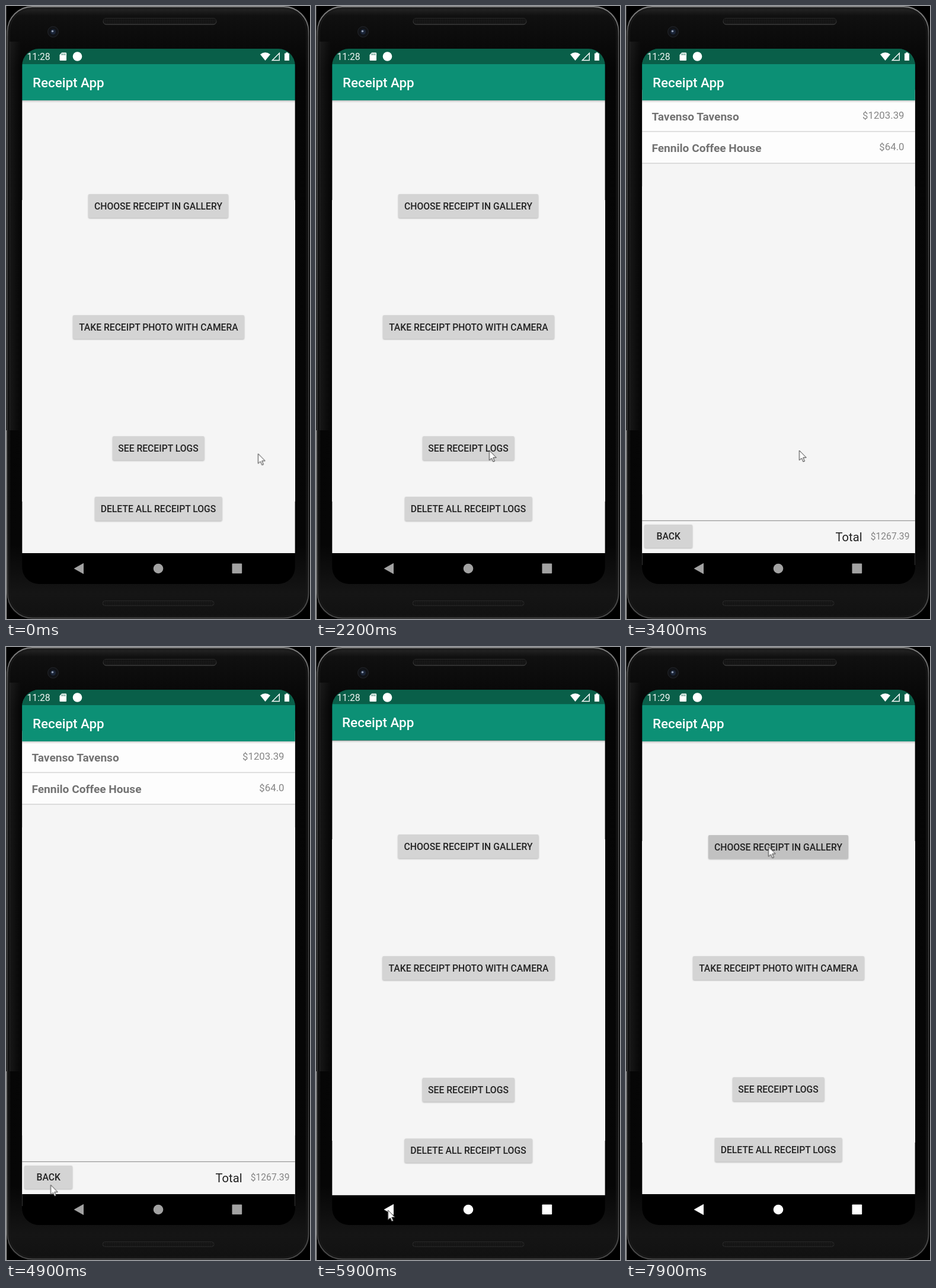
These frames come from a looping animation (513 px wide and 1033 px high, 8 s). An HTML page:

```html
<!DOCTYPE html>
<html lang="en">
<head>
<meta charset="utf-8">
<title>Receipt App demo</title>
<style>
  html, body { margin: 0; width: 100%; height: 100%; overflow: hidden; background: #000; }
  svg { display: block; width: 513px; height: 1033px; }
  text { font-family: Roboto, sans-serif; }

  .title { font-size: 22.4px; font-weight: 500; fill: #fff; }
  .clock { font-size: 15.7px; fill: #f1f6f4; }
  .button rect { fill: #d4d4d4; filter: drop-shadow(0 1px 1px #0004); }
  .button text { font-size: 15.7px; font-weight: 500; fill: #222; text-anchor: middle; }
  .name { font-size: 19.1px; font-weight: 700; fill: #727272; }
  .price { font-size: 16.8px; fill: #858585; text-anchor: end; }
  .price.sum { font-size: 15.7px; }
  .total { font-size: 20.2px; fill: #222; }
  .raised { filter: drop-shadow(0 0 4px #0009); }

  /* One loop is 8 s; 1.25% is one 100 ms tick. */
  .menu, .logs, .nav, .early, .late, .cursor, #see rect, #choose rect {
    animation: 8s step-end infinite;
  }
  .menu, .logs { transform-origin: 257.5px 521px; }
  .menu { animation-name: menu; }
  .logs { animation-name: logs; }
  .nav { animation-name: nav; }
  .early { animation-name: early; }
  .late { animation-name: late; }
  .cursor { animation-name: cursor; }
  #see rect { animation-name: press-see; }
  #choose rect { animation-name: press-choose; }

  @keyframes menu {
    0% { transform: scale(1); }
    37.5% { transform: scale(1.001); }
    38.75% { transform: scale(1.042); }
    40% { transform: scale(1.048); }
    41.25% { transform: scale(1.05); }
    71.25% { transform: scale(1.1); }
    72.5% { transform: scale(1.019); }
    73.75% { transform: scale(1.0045); }
    75% { transform: scale(1.0007); }
    76.25%, 100% { transform: scale(1); }
  }
  @keyframes logs {
    0% { opacity: 0; transform: scale(.85); }
    38.75% { opacity: 1; transform: scale(.976); }
    40% { opacity: 1; transform: scale(.994); }
    41.25% { opacity: 1; transform: scale(.999); }
    42.5% { opacity: 1; transform: scale(1); }
    71.25% { opacity: 1; transform: scale(.9995); }
    72.5%, 100% { opacity: 0; transform: scale(.919); }
  }
  @keyframes nav {
    0% { fill: #a2a2a2; }
    70%, 100% { fill: #fff; }
  }
  @keyframes early {
    0% { opacity: 1; }
    87.5%, 100% { opacity: 0; }
  }
  @keyframes late {
    0% { opacity: 0; }
    87.5%, 100% { opacity: 1; }
  }
  @keyframes press-see {
    0% { fill: #d4d4d4; }
    31.25% { fill: #d4d4d4; animation-timing-function: steps(3); }
    35% { fill: #c1c1c1; }
    42.5%, 100% { fill: #d4d4d4; }
  }
  @keyframes press-choose {
    0% { fill: #d4d4d4; }
    95% { fill: #d4d4d4; animation-timing-function: steps(3); }
    98.75%, 100% { fill: #c1c1c1; }
  }
  @keyframes cursor {
    0% { transform: translate(425.5px, 754.5px); }
    5% { transform: translate(425.5px, 754px); }
    15% { transform: translate(425.5px, 754px); animation-timing-function: steps(3); }
    18.75% { transform: translate(409.5px, 754px); }
    20% { transform: translate(409.5px, 754px); animation-timing-function: steps(5); }
    26.25% { transform: translate(287px, 748px); }
    27.5% { transform: translate(292.5px, 749px); }
    46.25% { transform: translate(292.5px, 749px); animation-timing-function: steps(5); }
    52.5% { transform: translate(165px, 840px); animation-timing-function: steps(4); }
    57.5% { transform: translate(84.5px, 900px); }
    58.75% { transform: translate(75.5px, 906.5px); }
    61.25% { transform: translate(75.5px, 906.5px); animation-timing-function: steps(6); }
    68.75% { transform: translate(121.5px, 949px); }
    80% { transform: translate(121.5px, 949px); animation-timing-function: steps(3); }
    83.75% { transform: translate(135px, 880px); animation-timing-function: steps(5); }
    90% { transform: translate(222px, 420px); animation-timing-function: steps(3); }
    93.75%, 100% { transform: translate(240.5px, 336.5px); }
  }
</style>
</head>
<body>
<svg viewBox="0 0 513 1033">
  <defs>
    <linearGradient id="body" x2="0" y2="1">
      <stop offset="0" stop-color="#2a2a2a"/>
      <stop offset=".015" stop-color="#101010"/>
      <stop offset=".1" stop-color="#050505"/>
      <stop offset=".88" stop-color="#060606"/>
      <stop offset=".96" stop-color="#151515"/>
      <stop offset="1" stop-color="#111"/>
    </linearGradient>
    <linearGradient id="rim" x2="0" y2="1">
      <stop offset="0" stop-color="#858585"/>
      <stop offset=".05" stop-color="#505050"/>
      <stop offset=".7" stop-color="#333"/>
      <stop offset="1" stop-color="#484848"/>
    </linearGradient>
    <linearGradient id="glint">
      <stop offset="0" stop-color="#fff" stop-opacity=".07"/>
      <stop offset="1" stop-color="#fff" stop-opacity="0"/>
    </linearGradient>
    <linearGradient id="lip" x2="0" y2="1">
      <stop offset=".3" stop-color="#242424"/>
      <stop offset="1" stop-color="#4c4c4c"/>
    </linearGradient>
    <linearGradient id="shade" x2="0" y2="1">
      <stop offset="0" stop-opacity=".2"/>
      <stop offset="1" stop-opacity="0"/>
    </linearGradient>
    <pattern id="mesh" width="3" height="3" patternUnits="userSpaceOnUse">
      <rect width="3" height="3" fill="#191919"/>
      <circle cx="1.5" cy="1.5" r=".8" fill="#060606"/>
    </pattern>
    <clipPath id="screen"><rect x="27.3" y="72" width="460.4" height="902" rx="28"/></clipPath>
    <g id="page">
      <rect x="27" y="72" width="461" height="902"/>
      <rect x="27" y="72" width="461" height="26" fill="#095f49"/>
      <rect x="27" y="159" width="461" height="763" fill="#f5f5f5"/>
      <rect x="27" y="98" width="461" height="61" fill="#0c9075"/>
      <text class="title" x="45" y="137">Receipt App</text>
    </g>
    <rect id="shadow" x="27" y="159" width="461" height="4" fill="url(#shade)"/>
  </defs>

  <!-- phone body -->
  <rect width="513" height="1033"/>
  <rect x="2.5" y="1" width="508" height="1030.500" rx="42" fill="url(#body)" stroke="url(#rim)" stroke-width="2"/>
  <rect x="6" y="4.5" width="501" height="1024" rx="38" fill="none" stroke="#191919" stroke-width="1.5"/>
  <rect x="6" y="60" width="20" height="655" fill="url(#glint)"/>
  <path d="M.5 0V715" stroke="#3a3a3a"/>
  <path d="M.5 715V1033" stroke="#b5b5b5"/>
  <rect x="164" y="20.5" width="191" height="10.5" rx="5" fill="url(#mesh)" stroke="url(#lip)"/>
  <rect x="163" y="1002.5" width="188" height="8" rx="4" fill="url(#mesh)" stroke="#2b2b2b"/>
  <circle cx="79.5" cy="43.5" r="9" fill="#111317" stroke="#24262a"/>
  <circle cx="79.5" cy="43.5" r="4.5" fill="#1c2638"/>
  <circle cx="78.5" cy="42.5" r="1.8" fill="#8e9ab0"/>

  <g clip-path="url(#screen)">
    <g class="menu">
      <use href="#page"/>
      <use href="#shadow"/>
      <g class="button" id="choose">
        <rect x="139" y="317" width="236" height="40" rx="2"/>
        <text x="257" y="343">CHOOSE RECEIPT IN GALLERY</text>
      </g>
      <g class="button">
        <rect x="113" y="521" width="289" height="40" rx="2"/>
        <text x="257.5" y="547">TAKE RECEIPT PHOTO WITH CAMERA</text>
      </g>
      <g class="button" id="see">
        <rect x="180" y="725" width="154.5" height="40.5" rx="2"/>
        <text x="257" y="750.5">SEE RECEIPT LOGS</text>
      </g>
      <g class="button">
        <rect x="150" y="827" width="214.5" height="40.5" rx="2"/>
        <text x="257" y="852.5">DELETE ALL RECEIPT LOGS</text>
      </g>
    </g>

    <g class="logs">
      <rect class="raised" x="27" y="72" width="461" height="902"/>
      <use href="#page"/>
      <rect x="27" y="159" width="461" height="106" fill="#fdfdfd"/>
      <path d="M27 211.5H488M27 265H488" stroke="#d4d4d4" stroke-width="1.3"/>
      <use href="#shadow"/>
      <text class="name" x="43.5" y="192.5">Tavenso Tavenso</text>
      <text class="price" x="469.5" y="190">$1203.39</text>
      <text class="name" x="43.5" y="245.5">Fennilo Coffee House</text>
      <text class="price" x="469.5" y="243">$64.0</text>
      <path d="M27 867.3H488" stroke="#999" stroke-width="1.3"/>
      <g class="button">
        <rect x="31" y="874" width="81" height="39" rx="2"/>
        <text x="71.7" y="898.5">BACK</text>
      </g>
      <text class="total" x="353.5" y="901.8">Total</text>
      <text class="price sum" x="478.5" y="898.5">$1267.39</text>
    </g>

    <!-- system bars -->
    <text class="clock early" x="35.5" y="91">11:28</text>
    <text class="clock late" x="35.5" y="91">11:29</text>
    <g fill="#fff">
      <path d="M94 78.5h7q1 0 1 1v11.5q0 1-1 1h-9.500q-1 0-1-1v-8.500z"/>
      <path d="M94.5 80v3M97 80v3M99.5 80v3" stroke="#095f49" stroke-width=".9"/>
      <circle cx="120.5" cy="85" r="7.8"/>
      <path d="M429 81.5q8.5-6.500 17 0l-8.500 10.500z"/>
      <path d="M461.3 79.5v12h-12z" fill="none" stroke="#fff" stroke-width="1.4"/>
      <path d="M470 79.8h2.3v-1.500h3.400v1.500h2.300v12.200h-8z"/>
    </g>
    <g class="nav">
      <path d="M114.5 948 131 938.700v18.600z"/>
      <circle cx="257" cy="948" r="8.3"/>
      <rect x="381.5" y="939.5" width="16.7" height="16.7" rx="1"/>
    </g>
  </g>

  <path class="cursor" d="M0 0V16.500L3.800 13 6.500 19 9 18 6.400 12H11.700Z" fill="#fff" stroke="#333" stroke-linejoin="round"/>
</svg>
</body>
</html>
```
